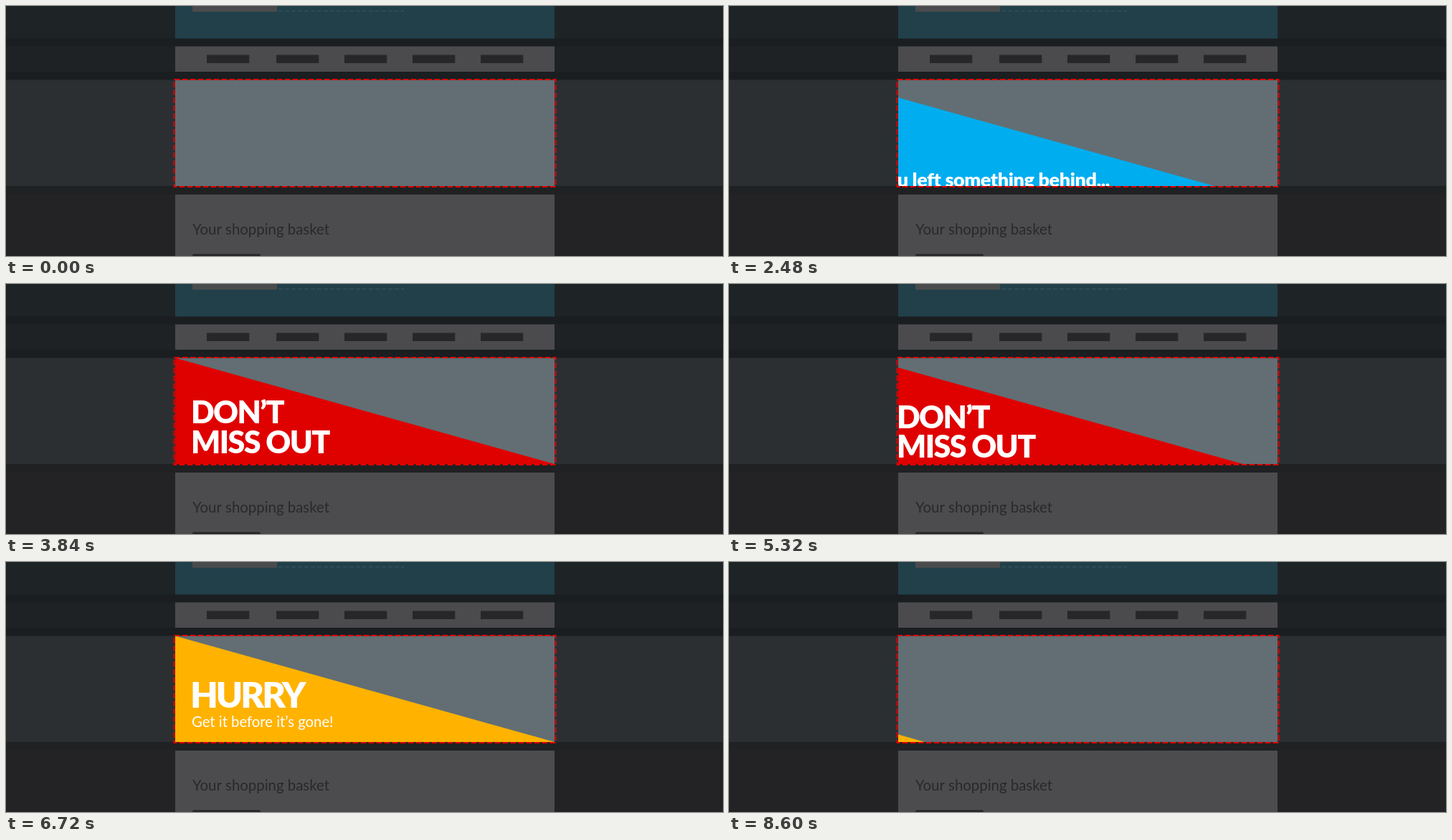
These frames come from a looping animation (1000x350 px, 8640 ms). An HTML page with a canvas:

```html
<!DOCTYPE html>
<html lang="en">
<head>
<meta charset="utf-8">
<title>Basket banner</title>
<style>
  html, body { margin: 0; width: 100%; height: 100%; overflow: hidden; background: #1a1e20; }
  canvas { display: block; width: 1000px; height: 350px; }
</style>
</head>
<body>
<canvas id="stage" width="1000" height="350"></canvas>
<script>
const ctx = document.getElementById('stage').getContext('2d');
const LOOP = 8640;
const STEP = 40;
const BOX = { x: 236, y: 103.5, w: 529, h: 148.5 };

// enter and leave: [start time, start size, end time, end size]
const banners = [
  {
    color: '#00adef',
    enter: [480, 0, 960, 1],
    leave: [2400, 1, 2880, 0],
    lines: [['You left something behind...', 249, 240.5, 900, 27, -0.4]]
  },
  {
    color: '#df0000',
    enter: [3440, 0.056, 3840, 1],
    leave: [5280, 1, 5720, 0],
    lines: [
      ['DON’T', 258, 195, 900, 43, -1.6],
      ['MISS OUT', 258, 236.5, 900, 43, -1.6]
    ]
  },
  {
    color: '#ffb200',
    enter: [6240, 0, 6720, 1],
    leave: [8160, 1, 8600, 0.07],
    lines: [
      ['HURRY', 257, 204, 900, 50, -3],
      ['Get it before it’s gone!', 259, 230.5, 400, 20.3, 0]
    ]
  }
];

function rect(color, x, y, w, h) {
  ctx.fillStyle = color;
  ctx.fillRect(x, y, w, h);
}

function text(color, [str, x, y, weight, size, spacing]) {
  ctx.font = `${weight} ${size}px Lato, sans-serif`;
  ctx.letterSpacing = spacing + 'px';
  ctx.fillStyle = color;
  ctx.fillText(str, x, y);
}

function dashes(color, width, pattern, draw) {
  ctx.strokeStyle = color;
  ctx.lineWidth = width;
  ctx.setLineDash(pattern);
  ctx.beginPath();
  draw();
  ctx.stroke();
  ctx.setLineDash([]);
}

function drawPage() {
  rect('#1a1e20', 0, 0, 1000, 350);
  rect('#1e2326', 0, 0, 1000, 45.5);
  rect('#1e2225', 0, 56.5, 1000, 35.5);
  rect('#2b2f32', 0, 103.5, 1000, 148.5);
  rect('#1f2123', 0, 252, 1000, 12);
  rect('#232325', 0, 264, 1000, 86);

  rect('#22404a', 236, 0, 529, 45.5);
  rect('#4a4b4d', 260, 0, 118, 8);
  dashes('#35505a', 1.5, [6, 3], () => {
    ctx.moveTo(380, 7);
    ctx.lineTo(555, 7);
  });

  rect('#4b4b4d', 236, 56.5, 529, 35.5);
  for (const x of [280, 377, 472, 567, 662]) rect('#272729', x, 68.5, 59.3, 11.5);

  rect('#626e73', BOX.x, BOX.y, BOX.w, BOX.h);
  rect('#4c4c4e', 236, 264, 529, 86);
  text('#29292b', ['Your shopping basket', 260, 319.8, 400, 20.4, 0]);
  ctx.fillStyle = '#272729';
  ctx.beginPath();
  ctx.roundRect(260, 347.3, 95, 12, 2);
  ctx.fill();
}

function ramp(t, [t0, v0, t1, v1]) {
  const p = Math.min(1, Math.max(0, (t - t0) / (t1 - t0)));
  return v0 + (v1 - v0) * p;
}

function sizeAt({ enter, leave }, t) {
  if (t < enter[0] || t >= leave[2] + STEP) return 0;
  return ramp(t, t < leave[0] ? enter : leave);
}

// The wedge and its text slide together out of the lower left corner.
function drawBanner(banner, size) {
  const { x, y, w, h } = BOX;
  const away = (1 - size) / 2;
  ctx.save();
  ctx.beginPath();
  ctx.rect(x, y, w, h);
  ctx.clip();

  ctx.fillStyle = banner.color;
  ctx.beginPath();
  ctx.moveTo(x, y + h * (1 - size));
  ctx.lineTo(x + w * size, y + h);
  ctx.lineTo(x, y + h);
  ctx.fill();

  ctx.translate(-w * away, h * away);
  for (const line of banner.lines) text('#fff', line);
  ctx.restore();
}

function frame(now) {
  const t = Math.floor((now % LOOP) / STEP) * STEP;
  drawPage();
  for (const banner of banners) {
    const size = sizeAt(banner, t);
    if (size > 0) drawBanner(banner, size);
  }
  dashes('#e10000', 2, [8, 3], () => ctx.rect(234.5, 103, 532, 150));
  requestAnimationFrame(frame);
}

requestAnimationFrame(frame);
</script>
</body>
</html>
```
